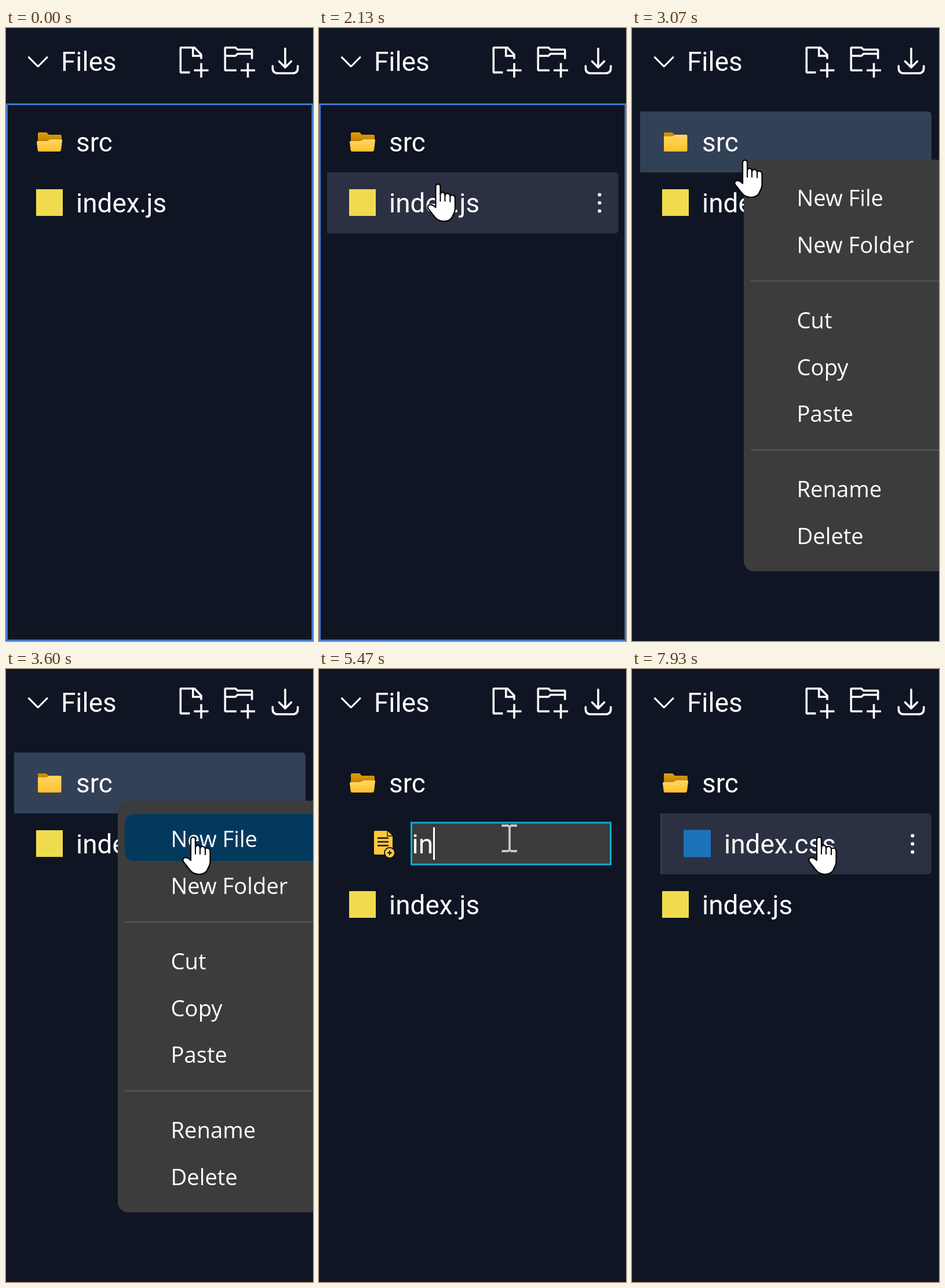
Write an HTML page with a canvas that moves like this. It is 530x1057 px and loops after 8000 ms.

```html
<!DOCTYPE html>
<html lang="en">
<head>
<meta charset="utf-8">
<title>File tree</title>
<style>
  html, body { margin: 0; width: 100%; height: 100%; overflow: hidden; background: #0f1523; }
  canvas { display: block; }
</style>
</head>
<body>
<canvas id="stage" width="530" height="1057"></canvas>
<script>
const ctx = document.getElementById('stage').getContext('2d', { alpha: false });
const LOOP = 8000, FPS = 15;
const BG = '#0f1523', HOVER = '#2b3142', GREY = '#3c3c3c', YELLOW = '#ffc83d';
const UI_FONT = '45.9px Roboto, sans-serif', MENU_FONT = '38.2px "Open Sans", sans-serif';

const clamp = v => Math.max(0, Math.min(1, v));
const easeInOut = p => p * p * (3 - 2 * p);
const easeOut = p => 1 - (1 - p) ** 2;

function rect(x, y, w, h, color, radii = 0) {
  ctx.fillStyle = color;
  ctx.beginPath();
  ctx.roundRect(x, y, w, h, radii);
  ctx.fill();
}
function text(str, x, y, font = UI_FONT) {
  ctx.font = font;
  ctx.fillStyle = '#fff';
  ctx.fillText(str, x, y);
}
function fill(d, color) {
  ctx.fillStyle = color;
  ctx.fill(new Path2D(d));
}
function stroke(d, width, color = '#fff', cap = 'butt') {
  ctx.lineWidth = width;
  ctx.strokeStyle = color;
  ctx.lineCap = cap;
  ctx.lineJoin = cap === 'round' ? 'round' : 'miter';
  ctx.stroke(new Path2D(d));
}
function dot(x, y, r, color) {
  ctx.fillStyle = color;
  ctx.beginPath();
  ctx.arc(x, y, r, 0, 7);
  ctx.fill();
}
function shade(y0, y1, top, bottom) {
  const g = ctx.createLinearGradient(0, y0, 0, y1);
  g.addColorStop(0, top);
  g.addColorStop(1, bottom);
  return g;
}

// Toolbar glyphs on a 16-unit grid.
const PLUS = 'M13 16H12V13H9V12H12V9H13V12H16V13H13Z';
const CHEVRON = 'M8 10.070L12.330 5.710L12.950 6.330L8.280 11H7.670L3 6.330L3.620 5.710Z';
const NEW_FILE = 'M9.500 1.100L12.900 4.600L13 5V7H12V6H8V2H3V13H7V14H2.500L2 13.500V1.500L2.500 1H9.200ZM9 2V5H11.900Z' + PLUS;
const NEW_FOLDER = 'M14.500 2H7.710L6.860 1.150L6.510 1H1.510L1 1.500V12.500L1.500 13H7V12H2V6H6.480L6.830 5.850L7.690 5H14V7H15V2.500Z' +
  'M14 4H7.490L7.140 4.150L6.280 5H2V2H6.290L7.140 2.850L7.500 3H14Z' + PLUS;
function glyph(d, x, y) {
  ctx.save();
  ctx.translate(x, y);
  ctx.scale(3.57, 3.57);
  ctx.fillStyle = '#fff';
  ctx.fill(new Path2D(d), 'evenodd');
  ctx.restore();
}

function header() {
  glyph(CHEVRON, 26.7, 28.2);
  text('Files', 95, 73.5);
  glyph(NEW_FILE, 292.4, 28.4);
  glyph(NEW_FOLDER, 372.9, 28.4);
  stroke('M482 35.500V67M471.500 57.500L482 68L492.500 57.500M460.300 65.500V69Q460.300 78 469 78H495Q503.700 78 503.700 69V65.500',
    3.6, '#fff', 'round');
}

function folder(open) {
  if (open) {
    fill('M55 182Q55 180 57 180H70L74 184H94Q96 184 96 186V206H55Z', shade(180, 198, '#e2a00c', '#b97a00'));
    fill('M53 197Q53 195 55 195H71L77 192H95Q97.500 192 97 194L95 210Q94.500 213 92 213H57Q55 213 54.600 210Z',
      shade(192, 213, '#ffd866', '#ffc02a'));
  } else {
    fill('M55 182Q55 180 57 180H69L74 184V190H55Z', '#d18c00');
    fill('M55 187H70L75 184H93.500Q95.500 184 95.500 186V211Q95.500 213 93.500 213H57Q55 213 55 211Z',
      shade(184, 213, '#ffd764', '#ffc02c'));
  }
}

function newFileIcon() {
  fill('M97 279H118L127 288V320H97Q95 320 95 318V281Q95 279 97 279Z', YELLOW);
  stroke('M118 279V288H127', 1.4, BG);
  stroke('M101 291.500H120M101 298H120M101 304.500H120', 2.4, BG);
  dot(122, 317, 10, BG);
  dot(122, 317, 8, YELLOW);
  stroke('M122 313V321M118 317H126', 2, BG);
}

function rowBack(x, y, color, alpha = 1) {
  ctx.globalAlpha = alpha;
  rect(x, y, 517 - x, 105, color, [0, 6, 6, 0]);
  ctx.globalAlpha = 1;
}
function menuDots(y) {
  for (const dy of [-14, 0, 14]) dot(484.3, y + dy, 3, '#fff');
}

function contextMenu(hot) {
  rect(193, 227, 400, 710, GREY, 18);
  if (hot) rect(205, 250, 400, 81, '#04395e', 16);
  rect(205, 434.5, 325, 3, '#505057');
  rect(205, 726, 325, 3, '#505057');
  const items = { 'New File': 306.5, 'New Folder': 387.5, Cut: 517.5, Copy: 598.5, Paste: 679, Rename: 809, Delete: 890 };
  for (const name in items) text(name, 284.5, items[name], MENU_FONT);
}

// Text typed so far, keyed by the time at which it appears.
const TYPED = [[4330, ''], [5330, 'i'], [5470, 'in'], [5600, 'inde'], [5800, 'index'],
  [6070, 'index.'], [6800, 'index.c'], [6930, 'index.cs'], [7200, 'index.css']];

function cssIcon() {
  rect(89, 277.5, 47, 47, '#1b73ba');
}
function inputRow(t) {
  if (t < 7130) newFileIcon(); else cssIcon();
  rect(158, 263.5, 347, 75, '#08b0cf');
  rect(161, 266.5, 341, 69, GREY);
  const [since, str] = TYPED.findLast(([at]) => t >= at);
  text(str, 160.5, 318);
  if ((t - since) % 1060 < 530)
    rect(Math.round(160.5 + ctx.measureText(str).width), 273, 3, 56, '#fff');
}

// Pointer path: [start, end, from, to, easing]
const MOVES = [
  [400, 1270, [520, 1070], [260, 410], easeOut],
  [1270, 1470, [260, 410], [242, 421], easeInOut],
  [1800, 2270, [242, 421], [193, 227], easeInOut],
  [3070, 3530, [193, 227], [317, 287], easeInOut],
  [3530, 3600, [317, 287], [321, 289], easeInOut]
];
function pointerAt(t) {
  const [start, end, from, to, ease] = MOVES.findLast(m => t >= m[0]) || MOVES[0];
  const p = ease(clamp((t - start) / (end - start)));
  return from.map((v, i) => v + (to[i] - v) * p);
}

const ARROW = 'M0 0V43L9.500 35L17 51L24.500 47.500L17.500 33H31.500Z';
const HAND = 'M-2 37V5Q-2 1 2 1Q6 1 6 5V18Q8 14 11 15Q14 16 14 20Q16 16 19 17Q23 18 23 22Q24 19 28 20Q31.500 21 31.500 26' +
  'V43Q31.500 48 28 54Q25 65 12 65Q2 65 -4 57L-15 43Q-17 38 -13 36.500Q-8 35 -2 41Z';
const BEAM = 'M-5.500 -19H5L8 -17L11 -19H21M8 -17V23M-5.500 25H5L8 23L11 25H21';
function pointer(kind, x, y) {
  ctx.save();
  ctx.translate(x, y);
  if (kind === 'arrow') {
    stroke(ARROW, 3.5, '#000');
    fill(ARROW, '#fff');
  } else if (kind === 'hand') {
    fill(HAND, '#fff');
    stroke(HAND, 2.2, '#000', 'round');
    stroke('M6 17V30M14 20V30M23 22V31', 2, '#000', 'round');
  } else {
    stroke(BEAM, 3.8, '#c6c6c6');
  }
  ctx.restore();
}

function draw(t) {
  const [x, y] = pointerAt(t);
  const menu = t >= 3000 && t < 4130, editing = t >= 4330 && t < 7800, created = t >= 7800;
  const open = t < 2730 || t >= 4330;
  const onSrc = t < 3000 && y < 249, onIndex = t < 4330 && !menu && y >= 249 && y < 354;

  rect(0, 0, 530, 1057, BG);
  header();
  if (t < 2730) {
    ctx.lineWidth = 3;
    ctx.strokeStyle = '#3f78d0';
    ctx.strokeRect(1.5, 131.5, 527.5, 924.5);
  }

  if (onSrc) rowBack(14, 144, HOVER);
  if (t >= 2730 && t < 3000) rowBack(14, 144, '#4178d0', clamp((t - 2660) / 200));
  if (t >= 3000 && t < 4330) rowBack(14, 144, '#334157');
  if (onSrc) menuDots(197);
  folder(open);
  text('src', 121, 213);

  const shift = editing || created ? 105 : 0;
  if (onIndex) {
    rowBack(14, 249, HOVER);
    menuDots(301.5);
  }
  rect(52, 278 + shift, 46, 46, '#f0db4f');
  text('index.js', 121, 318 + shift);

  if (editing) inputRow(t);
  if (created) {
    rowBack(49, 249, HOVER, clamp((t - 7730) / 200));
    rect(49, 249, 2.5, 104, '#3c3f46');
    cssIcon();
    text('index.css', 159, 318);
    menuDots(301.5);
  }
  if (menu) contextMenu(x > 205 && y > 250);
  if (t >= 470) pointer(editing ? 'beam' : y < 354 ? 'hand' : 'arrow', x, y);
}

function frame(now) {
  // Fifteen steps a second, each rounded to 10 ms.
  const step = Math.floor((now % LOOP + 5) * FPS / 1000);
  draw(Math.round(step * 100 / FPS) * 10 % LOOP);
  requestAnimationFrame(frame);
}
requestAnimationFrame(frame);
</script>
</body>
</html>
```
